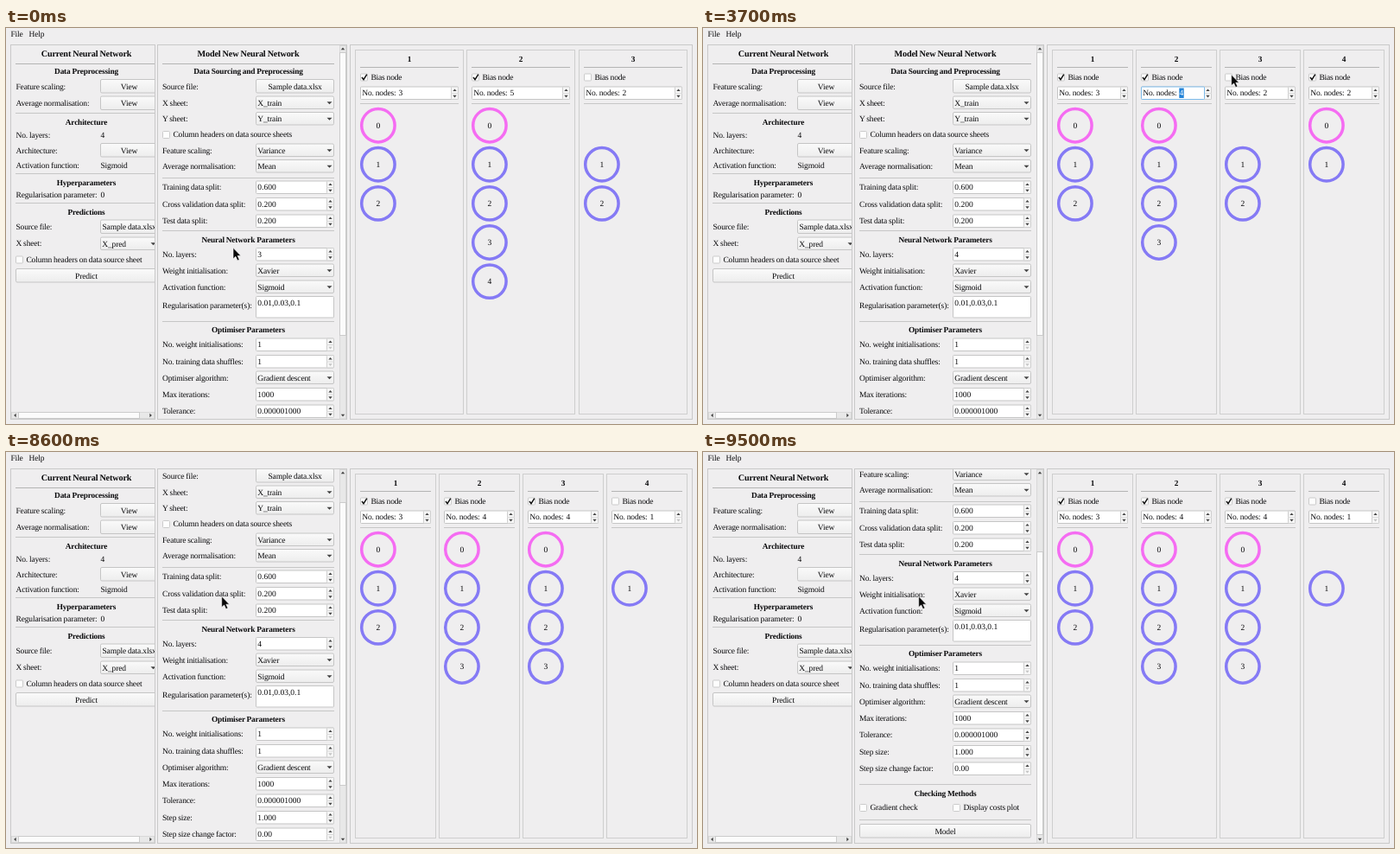
An HTML page for the animation above (9.6 s loop, 800 px wide and 458 px high).

```html
<!DOCTYPE html>
<html lang="en">
<head>
<meta charset="utf-8">
<title>Neural network editor</title>
<style>
html, body { margin: 0; width: 100%; height: 100%; overflow: hidden; background: #efeeef; }
svg { display: block; }
text { font: 9.5px "Liberation Serif", serif; fill: #0a0a0c; letter-spacing: -.16px; word-spacing: -.3px; text-rendering: geometricPrecision; white-space: pre; }
.head { font-weight: bold; font-size: 9.3px; letter-spacing: -.15px; }
.title { font-weight: bold; font-size: 10.2px; letter-spacing: -.15px; }
.num { letter-spacing: 0; }
.mid { text-anchor: middle; }
.sel { fill: #fff; }
</style>
</head>
<body>
<svg id="stage" width="800" height="458" viewBox="0 0 800 458">
  <defs>
    <linearGradient id="btn" x1="0" y1="0" x2="0" y2="1">
      <stop offset="0" stop-color="#fafafa"/><stop offset="1" stop-color="#ededed"/>
    </linearGradient>
    <clipPath id="leftClip"><rect x="6" y="20" width="166" height="424"/></clipPath>
    <clipPath id="midClip"><rect x="177" y="20" width="209" height="432.5"/></clipPath>
  </defs>
  <rect width="800" height="458" fill="#efeeef"/>
  <g id="frames"></g>
  <g clip-path="url(#leftClip)" id="left"></g>
  <g clip-path="url(#midClip)"><g id="model"></g></g>
  <g id="bars"></g>
  <rect id="thumb" x="386.5" y="28.5" width="7" height="327" fill="#fbfbfb" stroke="#cbcbcb"/>
  <g id="layers"></g>
  <path id="cursor" d="M0 0V12.6L2.9 10L5 14.6L7.2 13.6L5.1 9.2H8.9Z" fill="#080808" stroke="#fff" stroke-width=".6"/>
</svg>
<script>
const $ = id => document.getElementById(id);
const EDGE = "#c5c5c5";

const text = (x, y, s, cls = "") => `<text x="${x}" y="${y + 3}" class="${cls}">${s}</text>`;
const box = (x, y, w, h, fill, stroke, r = 0) =>
  `<rect x="${x}" y="${y}" width="${w}" height="${h}" rx="${r}" fill="${fill}" stroke="${stroke}"/>`;
const rule = (x1, x2, y, c = "#c6c6c6") => `<path d="M${x1} ${y}H${x2}" stroke="${c}"/>`;

// Small arrow head, turned by an angle; 0 points up
const tri = (x, y, angle, c = "#444") =>
  `<path d="M0 -1.4L2.2 1.2H-2.2Z" transform="translate(${x} ${y}) rotate(${angle})" fill="${c}"/>`;

const button = (x, y, w, s, cx = x + w / 2) =>
  box(x + .5, y - 8, w - 1, 15.5, "url(#btn)", EDGE, 1.5) + text(cx, y, s, "mid");

const combo = (x, y, w, s) =>
  box(x + .5, y - 7.5, w - 1, 14.5, "url(#btn)", EDGE, 1.5) + text(x + 2.3, y, s) +
  `<path d="M${x + w - 8.5} ${y - 1.3}h6l-3 3z" fill="#444"/>`;

const check = (x, y, s, on) =>
  box(x + .5, y - 3.5, 8, 8, "#fdfdfd", "#cbcbcb", 1) +
  (on ? `<path d="M${x + 2} ${y + .5}l2 2.6l3.8 -6" fill="none" stroke="#111" stroke-width="1.5"/>` : "") +
  text(x + 12.4, y, s);

// Number field: prefix is plain, value can be selected
function spin(x, y, w, prefix, value, focus, atMin) {
  const e = x + w - 9, px = x + 2.3, vx = prefix ? px + 42.3 : px;
  return box(x + .5, y - 7, w - 1, 14.5, "#fff", EDGE, 1) +
    box(e + .5, y - 7, 8, 14.5, "#f6f6f6", "#cfcfcf", 1) +
    rule(e, x + w, y + .5, "#dadada") +
    tri(e + 4.5, y - 3.2, 0) + tri(e + 4.5, y + 4, 180, atMin ? "#c4c4c4" : "#444") +
    (focus ? box(x + .5, y - 7, w - 9, 14.5, "#fff", "#7dbbea", 1) +
      `<rect x="${vx - .3}" y="${y - 5.5}" width="5.4" height="11.5" fill="#2383d8"/>` : "") +
    (prefix ? text(px, y, prefix) : "") + text(vx, y, value, focus ? "num sel" : "num");
}

function drawFrames() {
  const pane = (x, w) => box(x + .5, 19.5, w, 433, "none", "#c9c9c9");
  $("frames").innerHTML = text(5.5, 6.5, "File") + text(26.5, 6.5, "Help") +
    pane(5, 167) + pane(175, 219) + pane(398, 396);
  $("bars").innerHTML =
    box(6.5, 444.5, 165, 7, "#e8e8e8", "#d8d8d8") + box(14.5, 444.5, 140, 7, "#fbfbfb", "#cbcbcb") +
    tri(10.5, 448, -90) + tri(167.5, 448, 90) +
    box(386.5, 20.5, 7, 431.5, "#e8e8e8", "#d8d8d8") +
    tri(390, 24, 0) + tri(390, 448, 180);
}

function drawLeft() {
  const labels = [[67.5, "Feature scaling:"], [87, "Average normalisation:"], [123.5, "No. layers:"],
    [141.5, "Architecture:"], [159, "Activation function:"], [193, "Regularisation parameter:"],
    [230, "Source file:"], [249, "X sheet:"]];
  const heads = [[50, "Data Preprocessing"], [109, "Architecture"], [178.5, "Hyperparameters"], [212.5, "Predictions"]];
  $("left").innerHTML = text(93, 30, "Current Neural Network", "title mid") +
    heads.map(([y, s]) => text(93, y, s, "head mid")).join("") +
    labels.map(([y, s]) => text(11.5, y, s)).join("") +
    rule(11, 172, 41.5, "#b4b4b4") + [98.5, 168.5, 202.5].map(y => rule(11, 172, y)).join("") +
    [67.5, 87, 141.5].map(y => button(109, y, 67, "View")).join("") +
    text(109.5, 123.5, "4", "num") + text(109.5, 159, "Sigmoid") + text(109.5, 193, "0", "num") +
    button(109, 230, 67, "") + text(111.5, 230, "Sample data.xlsx") +
    combo(109, 249.5, 67, "X_pred") +
    check(11, 267.5, "Column headers on data source sheet") +
    button(11, 286.5, 164, "Predict");
}

function drawModel(count, focus) {
  const X = 289, W = 91;
  const lab = (y, s) => text(181, y, s);
  const drop = (y, s, v) => lab(y, s) + combo(X, y, W, v);
  const num = (y, s, v, min, f) => lab(y, s) + spin(X, y, W, "", v, f, min);
  const head = (y, s) => text(280.5, y, s, "head mid");
  $("model").innerHTML = text(280.5, 30, "Model New Neural Network", "title mid") +
    rule(181, 380, 41.5, "#b4b4b4") +
    [173.5, 234.5, 339.5, 500.5, 541.5].map(y => rule(181, 380, y)).join("") +
    head(50, "Data Sourcing and Preprocessing") +
    lab(67.5, "Source file:") + button(X, 67.5, W, "Sample data.xlsx") +
    drop(86.5, "X sheet:", "X_train") + drop(105, "Y sheet:", "Y_train") +
    check(181, 123, "Column headers on data source sheets") +
    drop(141.5, "Feature scaling:", "Variance") + drop(160, "Average normalisation:", "Mean") +
    num(184, "Training data split:", "0.600") +
    num(203.5, "Cross validation data split:", "0.200") +
    num(223, "Test data split:", "0.200") +
    head(244.5, "Neural Network Parameters") +
    num(261.5, "No. layers:", count, false, focus) +
    drop(280.5, "Weight initialisation:", "Xavier") + drop(299.5, "Activation function:", "Sigmoid") +
    lab(320.5, "Regularisation parameter(s):") + box(289.5, 310.5, 90, 24.5, "#fff", EDGE, 1) +
    text(291.3, 318, "0.01,0.03,0.1", "num") +
    head(349, "Optimiser Parameters") +
    num(366, "No. weight initialisations:", "1", true) + num(385.5, "No. training data shuffles:", "1", true) +
    drop(404.5, "Optimiser algorithm:", "Gradient descent") +
    num(423.5, "Max iterations:", "1000") + num(443, "Tolerance:", "0.000001000") +
    num(462.5, "Step size:", "1.000") + num(482, "Step size change factor:", "0.00", true) +
    head(511, "Checking Methods") +
    check(181, 527, "Gradient check") + check(289, 527, "Display costs plot") +
    button(181, 554.5, 199, "Model");
}

// Each layer is [has bias node, node count]
function drawLayers(list, focus) {
  const n = list.length, pitch = 388.4 / n, w = Math.round(pitch - 3.5);
  $("layers").innerHTML = list.map(([bias, nodes], i) => {
    const x = Math.round(404 + i * pitch), l = x + 6, r = x + w - 6;
    let s = box(x + .5, 25.5, w - 1, 421, "none", "#cecece") +
      text(x + w / 2, 35.5, i + 1, "head mid") + rule(l, r, 45.5, "#b4b4b4") + rule(l, r, 87.5) +
      check(l, 56.5, "Bias node", bias) +
      spin(l, 75, r - l, "No. nodes: ", nodes, focus === i, nodes === 1);
    for (let k = 0; k < nodes; k++) {
      const id = bias ? k : k + 1, cx = l + 20.9, cy = 112.7 + id * 45.1;
      s += `<circle cx="${cx}" cy="${cy}" r="19.2" fill="none" stroke="${id ? "#857af5" : "#f56cf2"}" stroke-width="3.5"/>` +
        text(cx, cy, id, "mid num");
    }
    return s;
  }).join("");
}

// Keys: [time, value, ...]; eased per segment when smooth is set
function along(keys, t, smooth) {
  let i = 0;
  while (i < keys.length - 2 && t >= keys[i + 1][0]) i++;
  const [t0, ...a] = keys[i], [t1, ...b] = keys[i + 1];
  let u = Math.min(1, Math.max(0, (t - t0) / (t1 - t0)));
  if (smooth) u = u * u * (3 - 2 * u);
  return a.map((v, k) => v + (b[k] - v) * u);
}

const path = [[0, 263, 254.3], [100, 263, 254.3], [800, 373.5, 257.7], [1400, 373.5, 257.7], [2000, 562, 95],
  [2300, 583, 77], [3000, 583, 77], [3300, 611.7, 54], [4100, 611.7, 54], [4700, 681, 71],
  [5200, 681, 71], [5600, 703.8, 57], [6800, 703.8, 57], [7800, 263, 153], [8100, 249.7, 167]];
const scroll = [[8300, 0], [8600, 40], [9100, 94], [9400, 116], [9500, 116]];

let last = "";
function render(t) {
  const [x, y] = along(path, t, true), [off] = along(scroll, t);
  $("cursor").setAttribute("transform", `translate(${x} ${y})`);
  $("model").setAttribute("transform", `translate(0 ${-Math.round(off)})`);
  $("thumb").setAttribute("y", 28.5 + Math.round(off * .75));

  const four = t >= 900, bias3 = t >= 3900, up3 = t >= 4900, bias4 = t < 5900;
  const layers = [[true, 3], [true, t < 2400 ? 5 : 4], [bias3, up3 ? 4 : bias3 ? 3 : 2]];
  if (four) layers.push([bias4, bias4 ? 2 : 1]);
  const focus = t >= 2400 && !bias3 ? 1 : up3 && bias4 ? 2 : -1;
  const key = JSON.stringify([layers, focus]);
  if (key === last) return;
  last = key;
  drawLayers(layers, focus);
  drawModel(four ? 4 : 3, four && t < 2400);
}

drawFrames();
drawLeft();
function tick() {
  render(Math.floor(performance.now() % 9600 / 100) * 100);
  requestAnimationFrame(tick);
}
tick();
</script>
</body>
</html>
```
